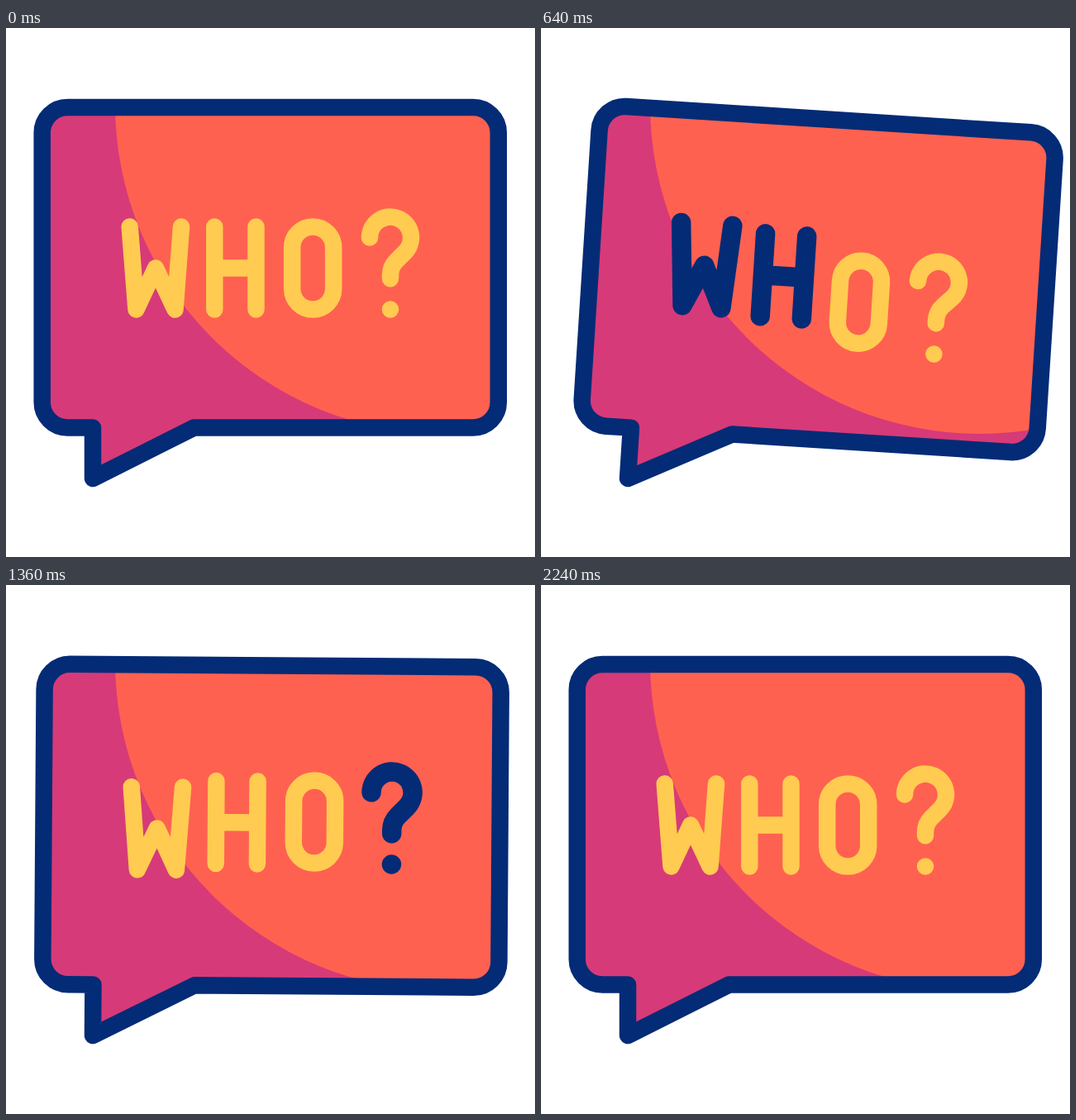
Animation of 640 by 640 pixels, one loop 2.6 s. Source, as an HTML page:

```html
<!DOCTYPE html>
<html lang="en">
<head>
<meta charset="utf-8">
<title>Who?</title>
<style>
  html, body { margin: 0; width: 100%; height: 100%; overflow: hidden; background: #fff; }
  svg { display: block; width: 100vw; height: 100vh; }
  .line { fill: none; stroke-linecap: round; stroke-linejoin: round; }
</style>
</head>
<body>
<svg viewBox="0 0 640 640">
  <defs>
    <path id="bubble" d="M74.4 96H565.1a30.7 30.7 0 0 1 30.7 30.7V452.8a30.7 30.7 0 0 1-30.7 30.7H227.5L105 545V483.5H74.4a30.7 30.7 0 0 1-30.7-30.7V126.7A30.7 30.7 0 0 1 74.4 96Z"/>
    <clipPath id="inside"><use href="#bubble" class="tilt"/></clipPath>
  </defs>
  <g clip-path="url(#inside)">
    <rect width="640" height="640" fill="#d73a78"/>
    <circle cx="530.5" cy="92.5" r="398.5" fill="#ff6150"/>
  </g>
  <g class="tilt">
    <use href="#bubble" class="line" stroke="#042b76" stroke-width="20.5"/>
    <g id="word"></g>
  </g>
</svg>
<script>
const LOOP = 2600, STEP = 40, FADE = 120;

// Key lists hold [ms, value] pairs.
const TILT = [[0, 0], [320, -4], [600, 4], [880, -2], [1160, 2], [1440, 0]];
const BOUNCE = [[0, 0], [320, 32], [600, -10], [880, 15], [1160, -7], [1440, 6], [1720, 0]];
const MARK_BOUNCE = [[360, 0], [680, 32], [1120, 0], [1360, -5], [1600, 0], [1920, 18], [2240, 0]];

const delayed = (keys, ms) => keys.map(([t, v]) => [t + ms, v]);

const GLYPHS = [
  { d: "M149.7 240.5L157.5 340.5L181 290.5L204.5 340.5L212 240.5",
    keys: BOUNCE, on: 180, off: 760 },
  { d: "M252.3 240.5V340.5M302.5 240.5V340.5M252.3 290.5H302.5",
    keys: delayed(BOUNCE, 120), on: 460, off: 1020 },
  { d: "M346.2 265.5a25 25 0 0 1 50 0v50a25 25 0 0 1-50 0Z",
    keys: delayed(BOUNCE, 240), on: 740, off: 1300 },
  { d: "M440 253.5a25 25 0 1 1 42.7 17.7l-10.3 10.3a25 25 0 0 0-7.4 17.7v4M465 340.5h.01",
    keys: MARK_BOUNCE, on: 1020, off: 1580 }
];

function make(tag, attrs, parent) {
  const el = document.createElementNS("http://www.w3.org/2000/svg", tag);
  for (const name in attrs) el.setAttribute(name, attrs[name]);
  return parent.appendChild(el);
}

const word = document.getElementById("word");
for (const glyph of GLYPHS) {
  const stroke = (color, width) =>
    make("path", { d: glyph.d, class: "line", stroke: color, "stroke-width": width }, glyph.group);
  glyph.group = make("g", {}, word);
  stroke("#ffcb51", 20.5);
  glyph.dark = stroke("#042b76", 23.5);
}

const clamp = x => Math.min(1, Math.max(0, x));

function valueAt(keys, t) {
  const next = keys.findIndex(key => key[0] > t);
  if (next === 0) return keys[0][1];
  if (next < 0) return keys[keys.length - 1][1];
  const [t0, a] = keys[next - 1], [t1, b] = keys[next];
  const p = (t - t0) / (t1 - t0);
  return a + (b - a) * p * p * (3 - 2 * p);
}

const ramp = (t, middle) => clamp((t - middle) / FADE + 0.5);
const tilted = document.querySelectorAll(".tilt");

function draw(t) {
  const turn = `rotate(${valueAt(TILT, t)} 105 545)`;
  tilted.forEach(el => el.setAttribute("transform", turn));
  for (const { group, dark, keys, on, off } of GLYPHS) {
    group.setAttribute("transform", `translate(0 ${valueAt(keys, t)})`);
    dark.setAttribute("opacity", ramp(t, on) - ramp(t, off));
  }
}

const start = performance.now();
function tick() {
  const t = (performance.now() - start) % LOOP;
  draw(Math.floor(t / STEP) * STEP);
  requestAnimationFrame(tick);
}
tick();
</script>
</body>
</html>
```
